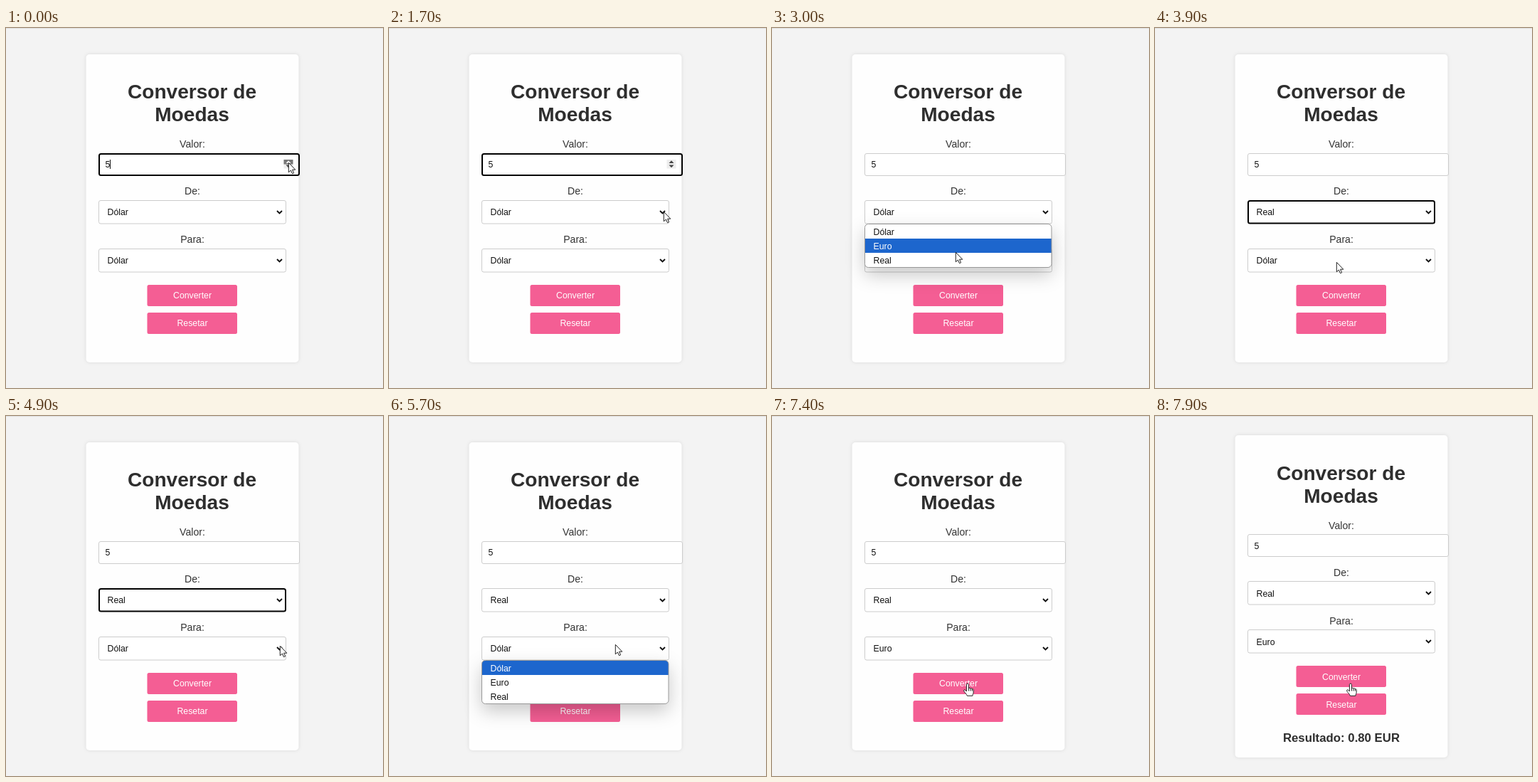
An HTML page for the animation above (8000 ms loop, 530 by 506 pixels).

```html
<!DOCTYPE html>
<html lang="pt">
<head>
<meta charset="utf-8">
<title>Conversor de Moedas</title>
<style>
  html, body { margin: 0; width: 100%; height: 100%; overflow: hidden; background: #f3f3f3; }
  svg { display: block; }
  text { font: 12.3px "Liberation Sans", Arial, sans-serif; fill: #111; }
  .mid { text-anchor: middle; }
  .label { font-size: 14.1px; fill: #333; }
  .title { font-size: 28.1px; font-weight: bold; fill: #2e2e2e; }
  .result { font-size: 16.8px; font-weight: bold; fill: #2e2e2e; }
  .button { fill: #f45e94; }
  .onPink, .on { fill: #fff; }
  .chevron { fill: none; stroke: #111; stroke-width: 1.9; }
  #card { fill: #fefefe; filter: drop-shadow(0 0 2.5px rgba(0, 0, 0, .1)); }
  .list { filter: drop-shadow(0 10px 13px rgba(0, 0, 0, .22)); }
</style>
</head>
<body>
<svg width="530" height="506" viewBox="0 0 530 506">
  <rect width="530" height="1" fill="#e0e0e0"/>
  <rect id="card" x="112.5" width="299" rx="5"/>
  <g id="shapes">
    <rect id="value" fill="#fff" rx="2.5"/>
    <rect id="from" fill="#fff" rx="2.5"/>
    <rect id="to" fill="#fff" rx="2.5"/>
    <path class="chevron" d="M381 257l3.5 3.5 3.5-3.5M381 325l3.5 3.5 3.5-3.5"/>
    <rect class="button" x="198.500" y="361" width="126.500" height="30" rx="2.500"/>
    <rect class="button" x="198.500" y="400" width="126.500" height="30" rx="2.500"/>
    <g id="spinner">
      <rect x="390.500" y="185" width="13" height="12.500" fill="#eee"/>
      <rect id="pressed" x="390.500" y="185" width="13" height="6.500" fill="#777"/>
      <path id="up" d="M393.500 190l3.500-3.700 3.500 3.700z"/>
      <path d="M393.500 192.500l3.500 3.700 3.500-3.700z" fill="#444"/>
    </g>
    <path id="caret" d="M146.500 185v13" stroke="#111"/>
  </g>
  <g id="words">
    <text class="mid title" x="261.500" y="99">Conversor de</text>
    <text class="mid title" x="261.500" y="131">Moedas</text>
    <text class="mid label" x="262" y="167.500">Valor:</text>
    <text class="mid label" x="262" y="233.500">De:</text>
    <text class="mid label" x="262" y="301.500">Para:</text>
    <text x="139.500" y="196">5</text>
    <text id="fromText" x="142.500" y="263"></text>
    <text id="toText" x="142.500" y="331"></text>
    <text class="mid onPink" x="262" y="380">Converter</text>
    <text class="mid onPink" x="262" y="419">Resetar</text>
  </g>
  <text id="result" class="mid result" x="262" y="458">Resultado: 0.80 EUR</text>
  <g id="lists"></g>
  <g id="cursor" fill="#fff" stroke="#222" stroke-linejoin="round">
    <path id="arrow" d="M.3.3V13.800l3.100-2.800 2.100 4.700 2.100-.9-2-4.600h4.200z"/>
    <path id="hand" d="M-1.600 11V1.600a1.500 1.500 0 0 1 3 0V7a1.400 1.400 0 0 1 2.600.3a1.400 1.400 0 0 1 2.400.5a1.200 1.200 0 0 1 1.800 1V12c0 2-1 3-1.300 5.300H-.6C-1.500 14.500-4 13-5.300 10.600c-.8-1.500 1-2.400 2.200-1.200zM1.400 7v3.500M4 7.300v3.200M6.400 7.800v2.700"/>
  </g>
</svg>
<script>
const LOOP = 8000;
const ROW = 20;
const OPTIONS = ['Dólar', 'Euro', 'Real'];

// Cursor stops: time, x, y
const PATH = [
  [0, 397, 189], [500, 397, 189], [1400, 386, 258], [2200, 386, 258], [2300, 386, 260],
  [2400, 386, 260], [3000, 258, 315], [3300, 255, 329], [4200, 255, 329], [4900, 385, 323],
  [5400, 385, 323], [5700, 318, 321], [6200, 232, 372], [6700, 232, 372],
  [7400, 275, 376], [LOOP, 275, 376]
];

const $ = id => document.getElementById(id);
const show = (id, on) => $(id).setAttribute('visibility', on ? 'visible' : 'hidden');
const clamp = (v, lo, hi) => Math.min(hi, Math.max(lo, v));
const between = (t, a, b) => t >= a && t < b;

function set(el, attrs) {
  for (const name in attrs) el.setAttribute(name, attrs[name]);
}

function cursorAt(t) {
  const i = PATH.findIndex(p => p[0] > t);
  const [t0, x0, y0] = PATH[i - 1], [t1, x1, y1] = PATH[i];
  const k = (t - t0) / (t1 - t0), e = k * k * (3 - 2 * k);
  return [x0 + (x1 - x0) * e, y0 + (y1 - y0) * e];
}

function field(id, y, w, h, focused) {
  const inset = focused ? 1 : .5;
  set($(id), {
    x: 130 + inset, y: y + inset, width: w - 2 * inset, height: h - 2 * inset,
    stroke: focused ? '#000' : '#ccc', 'stroke-width': 2 * inset
  });
}

function makeList(top, start, end) {
  const id = 'clip' + top;
  const g = document.createElementNS('http://www.w3.org/2000/svg', 'g');
  const box = `x="130.500" y="${top - .5}" width="262.500" height="61" rx="5"`;
  g.innerHTML = `<clipPath id="${id}"><rect ${box}/></clipPath>
    <rect class="list" ${box} fill="#fff"/>
    <rect class="mark" x="130.500" width="262.500" height="${ROW}" fill="#1d66cd" clip-path="url(#${id})"/>
    <rect ${box} fill="none" stroke="#999"/>` +
    OPTIONS.map((s, i) => `<text x="142.500" y="${top + 15 + i * ROW}">${s}</text>`).join('');
  $('lists').append(g);
  const mark = g.querySelector('.mark');
  const texts = g.querySelectorAll('text');
  return (t, y) => {
    const row = clamp(Math.floor((y - top) / ROW), 0, 2);
    set(g, { opacity: between(t, start, end) ? clamp((t - start + 80) / 160, 0, 1) : 0 });
    set(mark, { y: top + row * ROW });
    texts.forEach((el, i) => el.classList.toggle('on', i === row));
  };
}

const lists = [makeList(276, 1800, 3900), makeList(344, 5100, 6600)];

function draw(t) {
  const [x, y] = cursorAt(t);
  const typing = t < 1800, pressed = t < 200, done = t >= 7700;

  set($('card'), { y: done ? 27 : 37, height: done ? 453 : 433 });
  set($('shapes'), { transform: `translate(0 ${done ? -10 : 0})` });
  set($('words'), { transform: `translate(0 ${done ? -9 : 0})` });
  show('result', done);

  field('value', 176, 283, 32, typing);
  field('from', 242, 264, 33.5, between(t, 3900, 5100));
  field('to', 310, 264, 33.5, between(t, 6600, 7300));
  $('fromText').textContent = OPTIONS[t < 3900 ? 0 : 2];
  $('toText').textContent = OPTIONS[t < 6600 ? 0 : 1];

  set($('spinner'), { opacity: typing ? 1 : 0 });
  set($('pressed'), { opacity: pressed ? 1 : 0 });
  set($('up'), { fill: pressed ? '#fff' : '#444' });
  show('caret', typing && (t + 200) % 1000 < 500);

  lists.forEach(update => update(t, y));

  set($('cursor'), { transform: `translate(${x} ${y})` });
  show('arrow', t < 6600);
  show('hand', t >= 6600);
}

let begin;
function tick(now) {
  begin ??= now;
  draw((now - begin) % LOOP);
  requestAnimationFrame(tick);
}
draw(0);
requestAnimationFrame(tick);
</script>
</body>
</html>
```
